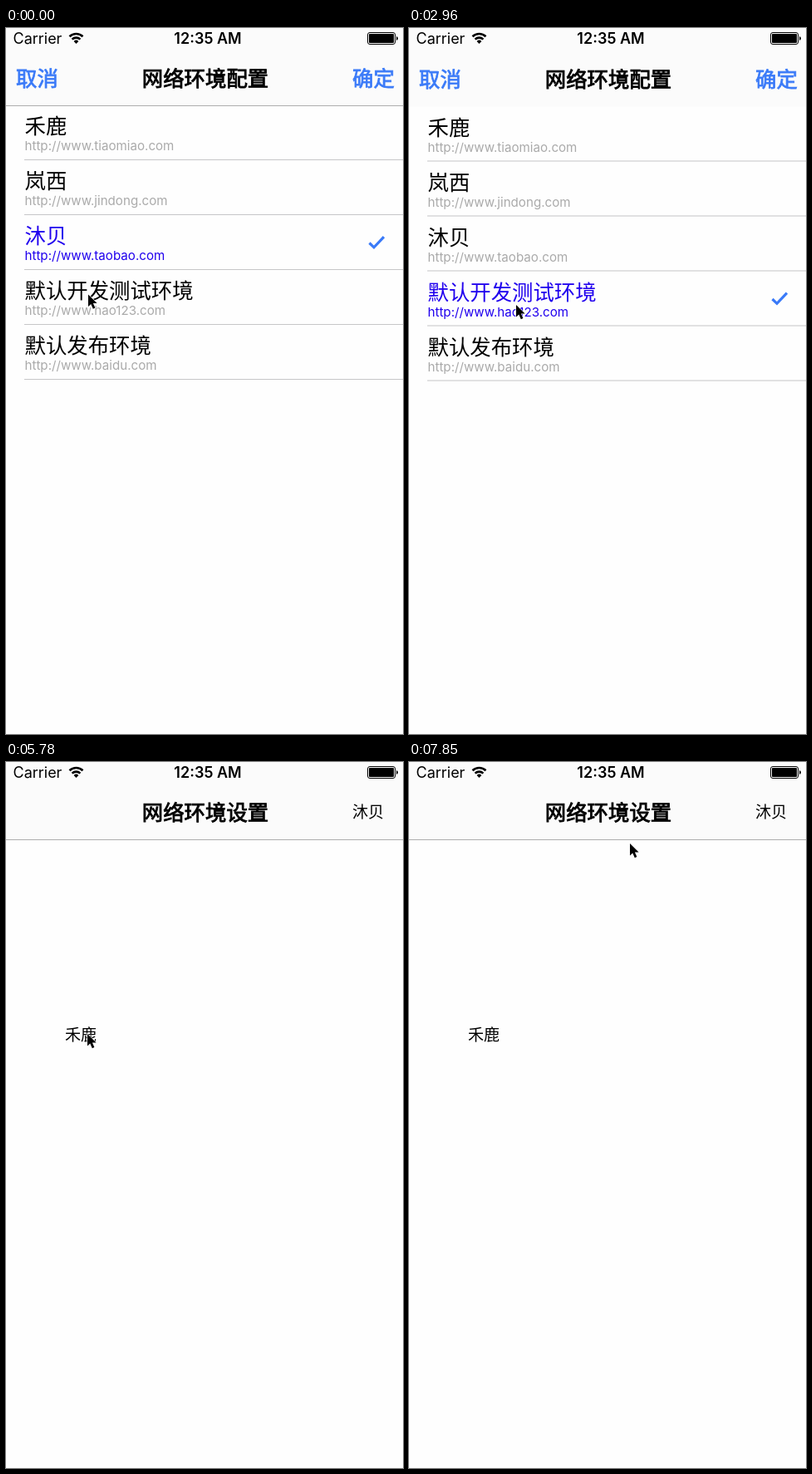
Animation, 478 px wide and 849 px high, one loop 8 s. Source, as an HTML page:

```html
<!DOCTYPE html>
<html lang="zh-CN">
<head>
<meta charset="utf-8">
<title>网络环境设置</title>
<style>
  html, body { margin: 0; width: 100%; height: 100%; overflow: hidden; background: #fefefe; }
  svg { display: block; width: 478px; height: 849px; }
  text { font-family: Inter, "Noto Sans CJK SC", "Noto Sans CJK", sans-serif; fill: #000; }
  .big { font-size: 25.4px; }
  .title { text-anchor: middle; stroke: #000; stroke-width: 0.9; }
  .bar { fill: #3a7af8; stroke: #3a7af8; stroke-width: 0.8; }
  .url { font-size: 15.15px; fill: #aaa; }
  .status { font-size: 18px; }
  .on .big, .on .url { fill: #2000ee; }
  .tick { fill: none; stroke: #3a7af8; stroke-width: 3.2; display: none; }
  .on .tick { display: inline; }
  .line { fill: #c6c6c8; }
  .edge { fill: #adadad; }
</style>
</head>
<body>
<svg viewBox="0 0 478 849">
  <rect width="478" height="849" fill="#fefefe"/>
  <g id="home">
    <rect width="478" height="93" fill="#fbfbfb"/>
    <rect class="edge" y="93" width="478" height="1"/>
    <text class="big title" x="240" y="69.5">网络环境设置</text>
    <text x="417" y="67" font-size="19.1">沐贝</text>
    <text id="label" x="90" text-anchor="middle"></text>
  </g>
  <g id="sheet">
    <rect width="478" height="849" fill="#fefefe"/>
    <rect width="478" height="93" fill="#fbfbfb"/>
    <rect id="edge" class="edge" y="93" width="478" height="1"/>
    <text id="cancel" class="big bar" x="12" y="69.5">取消</text>
    <text class="big title" x="240" y="69.5">网络环境配置</text>
    <text id="confirm" class="big bar" x="417" y="69.5">确定</text>
    <g id="rows"></g>
  </g>
  <g id="status">
    <text class="status" x="8.5" y="19">Carrier</text>
    <text class="status" x="243" y="19" font-weight="600" text-anchor="middle">12:35 AM</text>
    <g fill="none" stroke="#000" stroke-width="2.6">
      <path d="M76.5 10.3a11.4 11.4 0 0 1 16 0M79.6 13.6a7 7 0 0 1 9.8 0"/>
      <path d="M84.5 18.9l-2.9-3a4.1 4.1 0 0 1 5.8 0z" fill="#000" stroke="none"/>
    </g>
    <rect x="435.5" y="5.5" width="33" height="14" rx="2.5" fill="none" stroke="#000"/>
    <rect x="437" y="7" width="30" height="11" rx="1" fill="#000"/>
    <path d="M470 10v5q2-.6 2-2.5t-2-2.5z" fill="#000"/>
  </g>
  <path id="cursor" d="M0 0v14.6l3.3-3 2.5 5.6 2.6-1.1-2.5-5.5h4.7z" fill="#000" stroke="#fff" stroke-width="1.2" paint-order="stroke"/>
</svg>
<script>
const LOOP = 8000, COUNT = 54, STEP = LOOP / COUNT, HEIGHT = 849;
const $ = id => document.getElementById(id);

const names = ['禾鹿', '岚西', '沐贝', '默认开发测试环境', '默认发布环境'];
const hosts = ['tiaomiao', 'jindong', 'taobao', 'hao123', 'baidu'];

$('rows').innerHTML = names.map((name, i) => `
  <g transform="translate(0 ${i * 66})">
    <text class="big" x="22.5" y="127">${name}</text>
    <text class="url" x="22.5" y="147">http://www.${hosts[i]}.com</text>
    <path class="tick" d="M437.5 126.5l5.5 5.3 12-12.6"/>
    <rect class="line" x="22" y="158" width="456" height="1"/>
  </g>`).join('');
const rows = [...$('rows').children];

// Pointer stops: tick, x, y
const path = [
  [0, 99, 320.5], [5, 99, 320.5], [9, 428, 67], [11, 428, 67], [15, 129, 333],
  [22, 129, 333], [24, 183, 130], [26, 183, 130], [30, 428, 67], [34, 428, 67],
  [39, 98, 327], [45, 98, 327], [48, 36, 66], [50, 36, 66], [53, 266, 98]
];

// Sheet moves: start in seconds, opening or closing
const moves = [[1.44, false], [2.5355, true], [4.7, false], [6.0755, true], [7.213, false]];

function pointer(k) {
  const i = Math.max(1, path.findIndex(p => p[0] >= k));
  const [a, x0, y0] = path[i - 1], [b, x1, y1] = path[i];
  const u = (k - a) / (b - a), e = u * u * (3 - 2 * u);
  return [x0 + (x1 - x0) * e, y0 + (y1 - y0) * e];
}

// Critically damped spring, snapped to half pixels
function sheetTop(sec) {
  const move = moves.filter(m => m[0] <= sec).pop();
  if (!move) return 0;
  const w = 20 * (sec - move[0]);
  const rest = Math.exp(-w) * (1 + w);
  return Math.round(2 * HEIGHT * (move[1] ? rest : 1 - rest)) / 2;
}

const fade = (id, on) => $(id).setAttribute('opacity', on ? 0.25 : 1);

function draw(ms) {
  const k = Math.min(COUNT - 1, Math.floor((ms + 8) / STEP));
  const top = sheetTop(k * STEP / 1000);
  const chosen = k < 4 ? 2 : k < 26 ? 3 : 0;
  const shown = k < 9 ? 2 : k < 30 ? 3 : 0;

  rows.forEach((row, i) => row.classList.toggle('on', i === chosen));
  $('sheet').setAttribute('transform', `translate(0 ${top})`);
  $('edge').setAttribute('opacity', top ? 0 : 1);

  const long = names[shown].length > 4;
  $('label').textContent = names[shown];
  $('label').setAttribute('font-size', long ? 16.5 : 19.1);
  $('label').setAttribute('y', long ? 334 : 334.5);

  fade('confirm', k === 9 || k === 30 || k === 31);
  fade('cancel', k === 48);
  fade('label', k === 16 || k === 17 || k === 40 || k === 41);
  $('cursor').setAttribute('transform', `translate(${pointer(k)})`);
}

const begin = performance.now();
function tick() {
  draw((performance.now() - begin) % LOOP);
  requestAnimationFrame(tick);
}
draw(0);
requestAnimationFrame(tick);
</script>
</body>
</html>
```
